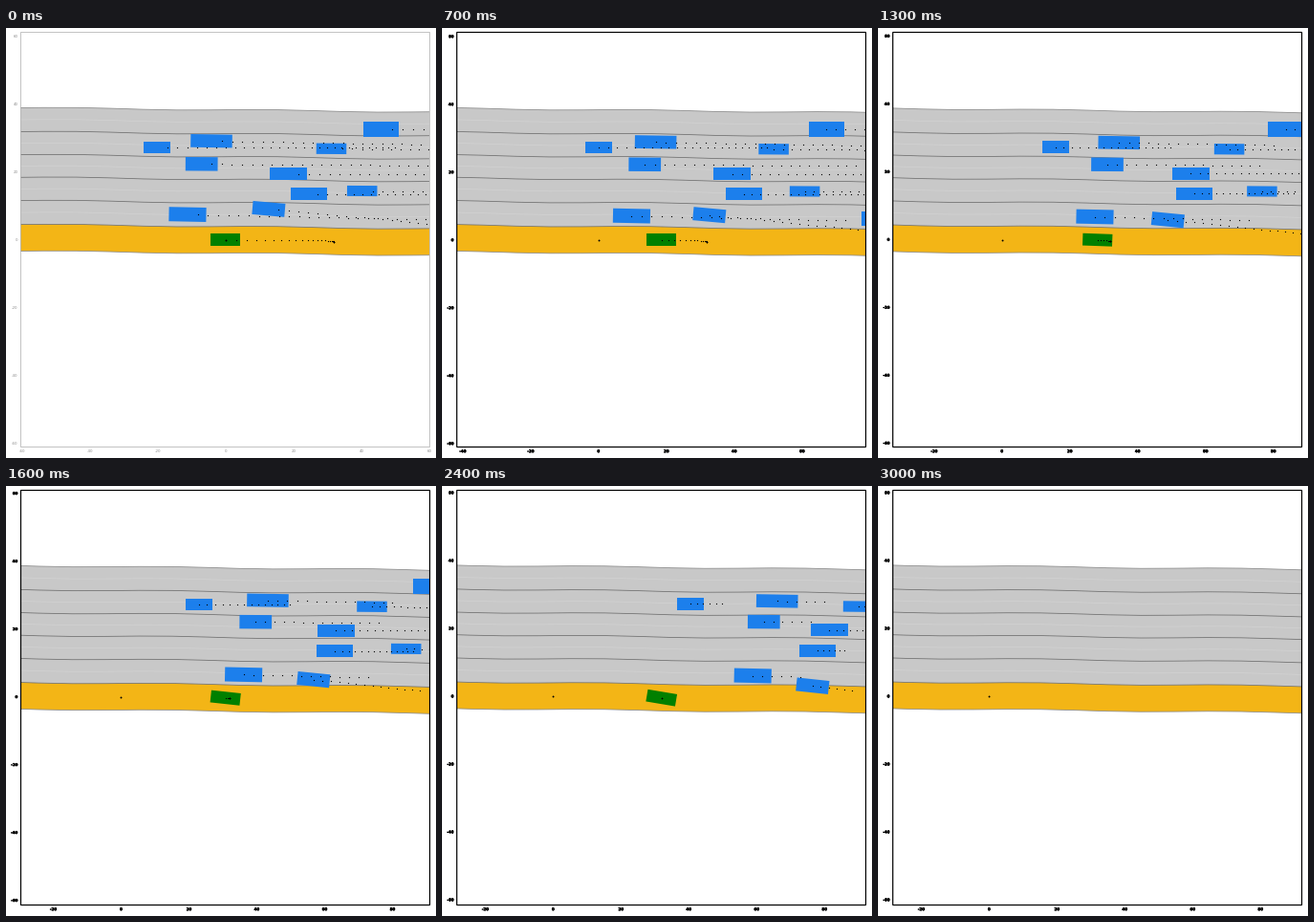
Animation, 450 px wide and 450 px high, one loop 3.5 s. Source, as a matplotlib script:

```python
import numpy as np
import matplotlib.pyplot as plt
from matplotlib.animation import FuncAnimation
from matplotlib.lines import Line2D
from matplotlib.patches import Polygon, Rectangle
from matplotlib.patheffects import withStroke
from matplotlib.transforms import Affine2D

SIZE, DPI = 450, 100
PX = 72 / DPI
STEPS, HOLD = 30, 4
TICK = 71
TRAVEL, STOP = 113.7, 19.8
CRUISE, BRAKE = 0.017, 0.08
ORIGIN = (116.3, 220.4)
EGO = (229.7, 221.7)

fig = plt.figure(figsize=(SIZE / DPI, SIZE / DPI), dpi=DPI, facecolor="white")
ax = fig.add_axes([0, 0, 1, 1])
ax.set_xlim(0, SIZE)
ax.set_ylim(SIZE, 0)
ax.axis("off")

# Everything on the road lives in world coordinates and moves with the view
shift = Affine2D()
world = shift + ax.transData
frame = ax.add_patch(Rectangle((15, 4), 428, 434, fill=False, zorder=8))


def remaining(t):
    """Distance the evenly braking ego car still has to cover."""
    return TRAVEL * (1 - np.minimum(t, STOP) / STOP) ** 2


def swerve(t):
    """Progress of the ego car's final turn, eased from 0 to 1."""
    p = np.clip((t - 10) / 10, 0, 1)
    return p * p * (3 - 2 * p)


def drift(t):
    return 1.8 * (1 - swerve(t))


def add_clipped(artist):
    ax.add_artist(artist)
    artist.set_clip_path(frame)
    return artist


def add_area(color, z):
    return add_clipped(Polygon(np.zeros((4, 2)), fc=color, ec="none",
                               zorder=z, transform=world))


def add_line(xs, ys, color, width):
    add_clipped(Line2D(xs, ys, color=color, lw=width * PX, zorder=2,
                       transform=world))


def add_dots(size=1.25):
    return add_clipped(Line2D([], [], ls="", marker="o", color="black",
                              ms=size * PX, mew=0, zorder=6, transform=world))


def border(k, x):
    """Slightly wavy lane border, counted from the top of the road."""
    y = 82.8 + 24.4 * k + 0.0107 * (x - 16)
    y += 0.7 * np.sin(2 * np.pi * (x - 10) / 205) + 0.6 * np.sin(1.3 * k)
    return y + (3 if k == 6 else 0)


def fill_road(xs, top, bottom, color):
    strip = np.vstack([np.column_stack([xs, top]),
                       np.column_stack([xs, bottom])[::-1]])
    add_area(color, 1).set_xy(strip)


def draw_road():
    xs = np.arange(-110, 480, 35)
    rows = [border(k, xs) for k in range(7)]
    fill_road(xs, rows[0], rows[5], "#c8c8c8")
    fill_road(xs, rows[5], rows[6], "#f3b516")
    for upper, lower in zip(rows[:5], rows[1:6]):
        add_line(xs, (upper + lower) / 2, "#d3d3d3", 0.7)
    for k, row in enumerate(rows):
        add_line(xs, row, "#707070" if 0 < k < 6 else "#8c8c8c", 0.8)


def box_corners(center, size, angle):
    w, h = size
    corners = np.array([(-w, -h), (w, -h), (w, h), (-w, h)]) / 2
    c, s = np.cos(angle), np.sin(angle)
    return corners @ np.array([(c, s), (-s, c)]) + center


class Car:
    """Car that slows down evenly and sways sideways along its way."""

    def __init__(self, size, start, speed, brake=BRAKE, sway=0):
        self.size, self.start = size, start
        self.speed, self.brake, self.sway = speed, brake, sway / STEPS
        self.body = add_area("#1c7fec", 4)
        self.dots = add_dots()

    def pos(self, t):
        x, y = self.start
        return (x - TRAVEL + self.speed * t - self.brake * t * t,
                y + self.sway * t)

    def draw(self, t):
        for part in (self.body, self.dots):
            part.set_visible(t < STEPS)
        angle = np.arctan2(self.sway, self.speed - 2 * self.brake * t)
        self.body.set_xy(box_corners(self.pos(t), self.size, angle))
        self.dots.set_data(*self.pos(np.arange(max(t, 1), STEPS)))


draw_road()
cars = [
    Car((37, 16), (392.5, 104.2), 11.4),
    Car((28, 12.6), (157.8, 123.2), 10.9),
    Car((43.5, 13.7), (215, 116.4), 10.8, CRUISE, sway=5),
    Car((33.7, 14.4), (204.7, 140.5), 10.65, CRUISE, sway=2),
    Car((39, 13), (295, 150.7), 11.25),
    Car((38, 13), (316.7, 172), 9.85),
    Car((31.5, 11), (372.7, 168.7), 11, sway=2),
    Car((31.5, 11.3), (340.5, 124.5), 11.1, 0.1, sway=2),
    Car((39, 15), (190, 193.3), 10.78, CRUISE, sway=6.5),
    Car((34, 14), (274.9, 187.6), 10.45, 0.042, sway=27),
    Car((38, 15), (463, 197.4), 8.8, 0),
]
ego = add_area("#008000", 5)
ego_dots = add_dots()
origin = add_dots(1.9)
origin.set_data([ORIGIN[0]], [ORIGIN[1]])


def add_label(k, ha):
    return ax.text(0, 0, str(20 * k), ha=ha, va="center_baseline",
                   fontsize=4 * PX, family="DejaVu Sans", zorder=9)


x_labels = {k: add_label(k, "center") for k in range(-3, 5)}
y_labels = {k: add_label(k, "right") for k in range(-3, 4)}
bold = [withStroke(linewidth=0.5 * PX, foreground="black")]


def draw_axes(t):
    faint = t == 0
    frame.set_edgecolor("#b4b4b4" if faint else "black")
    frame.set_linewidth((0.8 if faint else 1.2) * PX)
    for k, label in x_labels.items():
        x = ORIGIN[0] + remaining(t) + TICK * k
        label.set_position((x, 442.7))
        label.set_visible(13 < x < 444)
    for k, label in y_labels.items():
        label.set_position((12.4, 219.9 + drift(t) - TICK * k))
    for label in [*x_labels.values(), *y_labels.values()]:
        label.set_fontweight("normal" if faint else "bold")
        label.set_path_effects([] if faint else bold)
        label.set_alpha(0.45 if faint else 1)


def ego_pos(t):
    return EGO[0] - remaining(t), EGO[1] - drift(t)


def draw_ego(t):
    ego.set_visible(t < STEPS)
    ego.set_xy(box_corners(ego_pos(t), (31, 12.8),
                           np.radians(9.5) * swerve(t)))
    ego_dots.set_data(*ego_pos(np.arange(t, STEPS)))


def update(i):
    t = min(i, STEPS)
    shift.clear().translate(remaining(t), drift(t))
    draw_axes(t)
    draw_ego(t)
    for car in cars:
        car.draw(t)
    return []


anim = FuncAnimation(fig, update, frames=STEPS + 1 + HOLD, interval=100,
                     init_func=lambda: [], repeat=True, repeat_delay=0,
                     blit=False)
plt.show()
```
